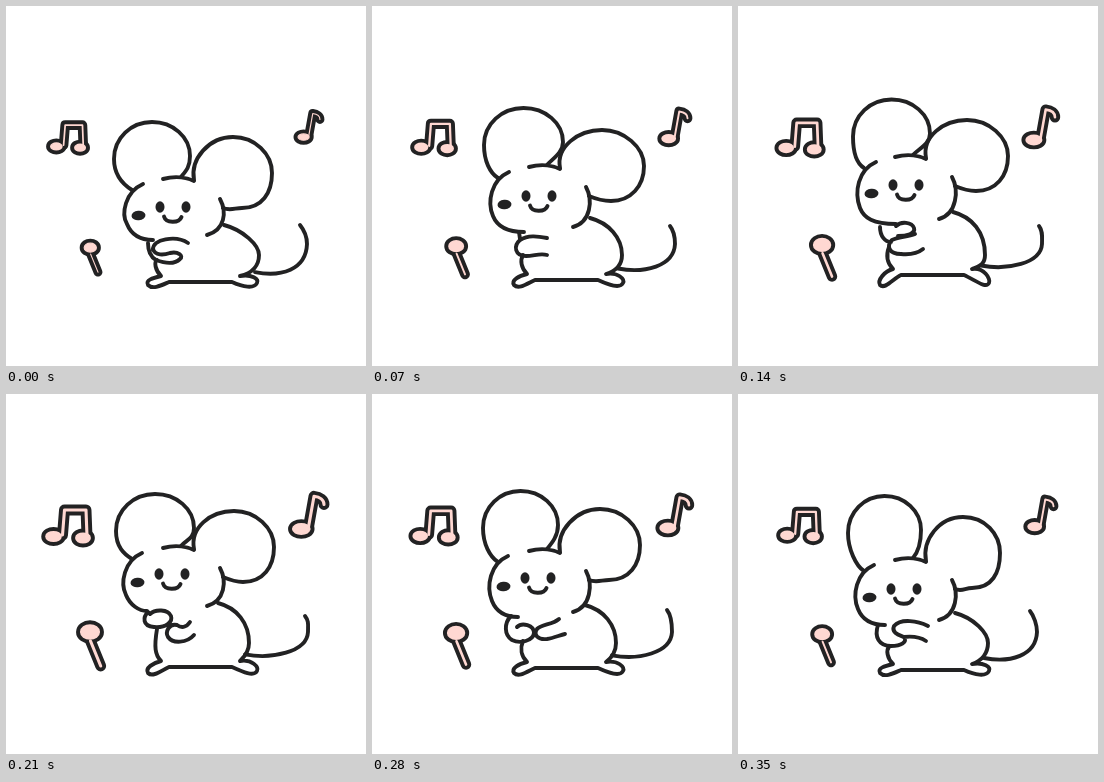
These frames come from a looping animation (360 px wide and 360 px high, 420 ms). An HTML page with a canvas:

```html
<!DOCTYPE html>
<html lang="en">
<head>
<meta charset="utf-8">
<title>Dancing mouse</title>
<style>
html, body { margin: 0; height: 100%; overflow: hidden; background: #fff; }
canvas { display: block; width: 100vw; height: 100vh; }
</style>
</head>
<body>
<canvas></canvas>
<script>
const INK = '#222223', PINK = '#ffd8d2', LINE = 3.9, STEP = 70;
const canvas = document.querySelector('canvas');
const ctx = canvas.getContext('2d');
const ratio = window.devicePixelRatio || 1;
canvas.width = canvas.height = 360 * ratio;

// head: top, bottom, chin x, eye y, shift; ears: left, top, right of one, top, right of the other;
// body: back x, y, rump x, floor, belly y; tail: reach, tip x, y; size of the notes
const poses = [
  { head: [172, 229, 147, 201, 0], ears: [108, 116, 184, 131, 266], body: [218, 219, 253, 276, 254], tail: [301, 294, 219], size: .72,
    arms: 'M147 244C146 233 170 229 182 237M147 243C149 250 158 249 164 247C172 245 178 250 174 253C168 259 158 257 150 254C143 250 142 243 142 237' },
  { head: [160, 221, 152, 190, 0], ears: [112, 102, 191, 124, 272], body: [218, 212, 250, 274, 249], tail: [303, 298, 220], size: .83,
    arms: 'M175 232C165 230 156 229 148 234C141 240 143 250 154 250C162 250 168 247 175 249M147 226L148 233' },
  { head: [150, 213, 158, 179, 1], ears: [115, 93.5, 192, 114, 270], body: [215, 206, 247, 269, 241], tail: [304, 301, 220], size: .93,
    arms: 'M158 220C163 215 174 216 176 222C178 228 168 230 160 230M142 221C142 230 147 236 153 236M177 228C170 231 160 231 154 234C148 240 151 248 163 248C173 249 180 247 185 243' },
  { head: [153, 212, 141, 180, -1], ears: [110, 100, 188, 117, 268], body: [212, 209, 243, 273, 235], tail: [302, 299, 222], size: 1,
    arms: 'M142 218C137 223 136 232 148 233C160 234 167 228 165 222C162 215 149 215 144 220M184 228C180 234 175 234 171 231C163 229 159 238 162 243C167 250 181 249 188 241' },
  { head: [156, 218, 146, 184, -1], ears: [111, 97, 186, 115, 268], body: [213, 211, 244, 274, 247], tail: [300, 295, 216], size: .93,
    arms: 'M139 222C132 229 132 241 140 246C148 250 161 247 162 239C162 231 150 228 145 233M187 225C180 231 170 230 165 235C161 241 166 246 175 245C182 244 188 241 193 240' },
  { head: [165, 226, 147, 195, -1], ears: [110, 102, 183, 123, 262], body: [217, 219, 250, 276, 253], tail: [299, 292, 217], size: .83,
    arms: 'M140 231C136 243 141 252 153 252C163 252 170 248 166 243C161 241 153 239 156 232C163 224 180 227 190 232M166 243C175 242 182 243 188 247' }
];

function stroke(d) {
  ctx.lineWidth = LINE;
  ctx.strokeStyle = INK;
  ctx.stroke(new Path2D(d));
}

function dot(x, y, rx, ry, tilt = 0) {
  ctx.fillStyle = INK;
  ctx.beginPath();
  ctx.ellipse(x, y, rx, ry, tilt, 0, 7);
  ctx.fill();
}

function drawEars([l, t, r, top, right], h) {
  const rad = (r - l) / 2, k = rad * .55, mid = l + rad;
  stroke(`M126 ${h + 12}C118 ${h + 7} ${l} ${t + 53} ${l} ${t + 37}
    C${l} ${t + 16} ${mid - k} ${t} ${mid} ${t}
    C${mid + k} ${t} ${r} ${t + 15} ${r} ${t + 34}
    C${r} ${t + 45} 180 ${h - 7} 175 ${h - 1}`);
  const cx = (188 + right) / 2, low = top + 71;
  stroke(`M188 ${h + 2}C184 ${h - 19} ${cx - 24} ${top} ${cx} ${top}
    C${cx + 22} ${top} ${right} ${top + 17} ${right} ${top + 36}
    C${right} ${top + 56} ${cx + 29} ${low} ${cx + 9} ${low}
    C${cx + 2} ${low} 224 ${h + 33} 217 ${h + 30}`);
}

function drawHead([h, b, chin, eye, dx]) {
  stroke(`M${137 + dx} ${h + 6}C${119 + dx} ${h + 14} ${115 + dx} ${h + 36} ${121 + dx} ${b - 11}
    C${125 + dx} ${b - 1} ${134 + dx} ${b + 5} ${chin} ${b + 5}
    M157 ${h + 1}C168 ${h - 2} 180 ${h - 1} 188 ${h + 3}
    M214 ${h + 21}C221 ${h + 34} 219 ${b - 5} 201 ${b}`);
  dot(154 + dx, eye, 4.5, 5.8);
  dot(180 + dx, eye, 4.5, 5.8);
  dot(132.5 + dx, eye + 8.5, 7, 4.8, -.1);
  stroke(`M${158 + dx} ${eye + 9.5}C${160 + dx} ${eye + 16.5} ${173 + dx} ${eye + 16.5} ${175.5 + dx} ${eye + 10}`);
}

function drawBody([x, y, rump, floor, belly], [reach, tipX, tipY], h) {
  stroke(`M${x} ${y}C${x + 19} ${y + 5} ${rump} ${y + 20} ${rump} 249
    C${rump} 259 ${rump - 6} ${floor - 9} 234 ${floor - 6}
    C246 ${floor - 8} 253 273 251 277C248 283 237 ${floor + 5} 226 ${floor}
    L163 ${floor}C156 ${floor + 3} 147 284 142 279
    C139 274 147 ${floor - 4} 155 ${floor - 6}C149 ${floor - 12} 148 ${floor - 20} 151 ${belly}`);
  const root = 214.5 + h * .3;
  stroke(`M${rump - 4} ${root}C${rump + 22} ${root + 5} ${reach - 1} ${root - 2} ${reach} 238
    C${reach} 231 ${tipX + 4} ${tipY + 5} ${tipX} ${tipY}`);
}

// Pink thick lines and round heads with one shared outline, scaled about (cx, cy)
function drawSign(size, cx, cy, stem, heads) {
  const lines = new Path2D(stem), blobs = new Path2D();
  for (const [x, y, rx, ry] of heads) {
    blobs.moveTo(x + rx, y);
    blobs.ellipse(x, y, rx, ry, 0, 0, 2 * Math.PI);
  }
  ctx.save();
  ctx.translate(cx, cy);
  ctx.scale(size, size);
  ctx.translate(-cx, -cy);
  for (const [color, side] of [[INK, 1], [PINK, -1]]) {
    ctx.fillStyle = ctx.strokeStyle = color;
    ctx.lineWidth = 7 + side * LINE / size;
    ctx.stroke(lines);
    ctx.stroke(blobs);
    ctx.fill(blobs);
  }
  ctx.restore();
}

function draw(now) {
  const p = poses[Math.floor(now / STEP) % poses.length];
  ctx.setTransform(ratio, 0, 0, ratio, 0, 0);
  ctx.fillStyle = '#fff';
  ctx.fillRect(0, 0, 360, 360);
  ctx.lineCap = ctx.lineJoin = 'round';

  drawEars(p.ears, p.head[0]);
  drawHead(p.head);
  drawBody(p.body, p.tail, p.head[0]);
  stroke(p.arms);

  drawSign(1 - (1 - p.size) * .7, 62, 132, 'M56.5 141L58.5 116H80L81 142',
    [[47.5, 142.5, 6.8, 4], [77, 144, 6.4, 4]]);
  drawSign(p.size, 303.5, 121, 'M302.5 133L308 102.3C314 103 318 106 318 110.5', [[295.3, 135, 7.8, 4.4]]);
  drawSign(p.size, 85, 251, 'M84.5 247L94.7 272', [[84, 238, 8.5, 6.2]]);
}

const start = performance.now();
function tick() {
  draw(performance.now() - start);
  requestAnimationFrame(tick);
}
tick();
</script>
</body>
</html>
```
